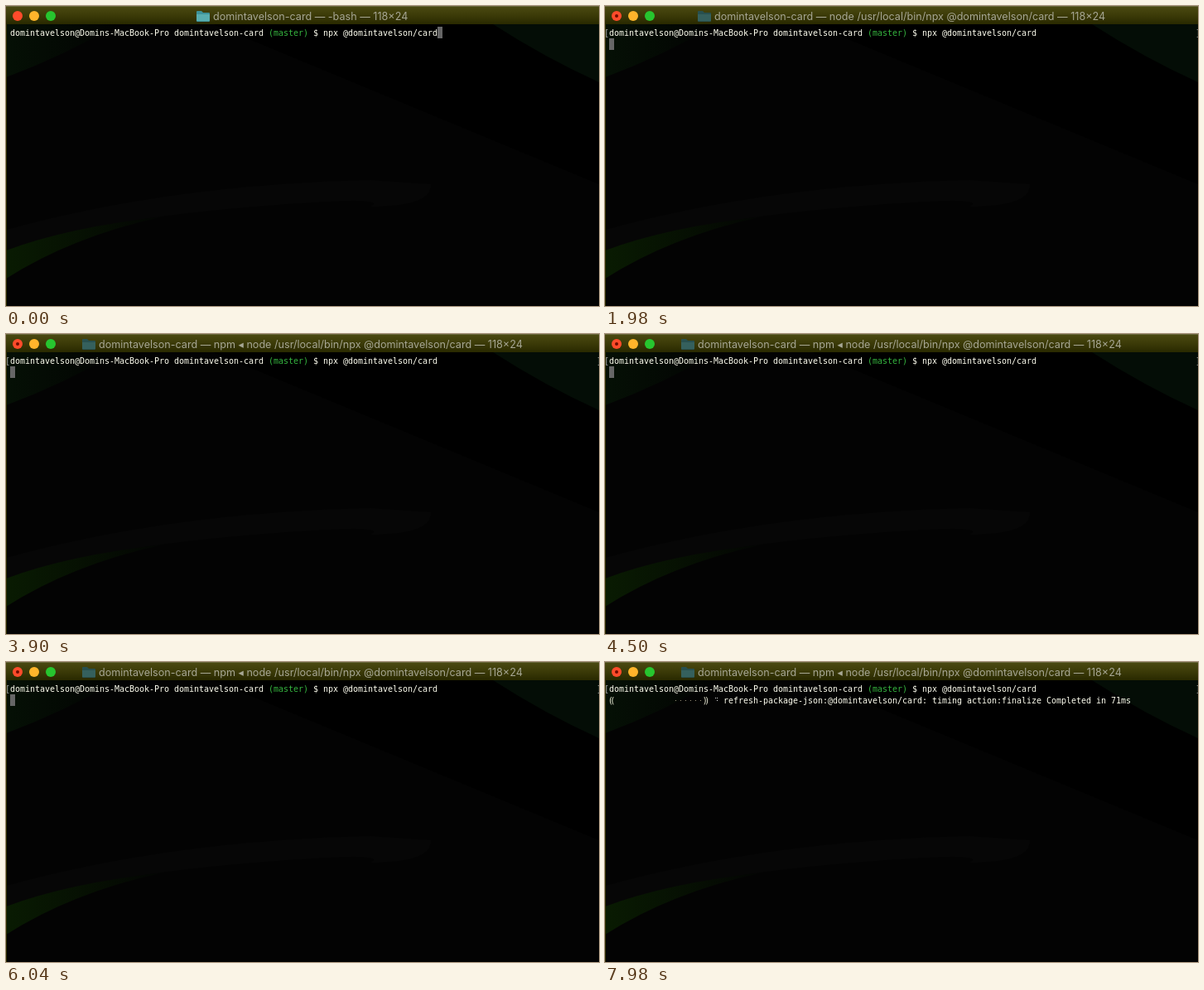
Recreate the animation shown at these times as an HTML page with a canvas. Size 716 by 362 pixels, loop 8000 ms.

```html
<!DOCTYPE html>
<html lang="en">
<head>
<meta charset="utf-8">
<title>Terminal</title>
<style>
  html, body { margin: 0; width: 100%; height: 100%; overflow: hidden; background: #000; }
  canvas { display: block; }
</style>
</head>
<body>
<canvas id="stage" width="716" height="362"></canvas>
<script>
const ctx = document.getElementById('stage').getContext('2d');
const WIDTH = 716, HEIGHT = 362, LOOP = 8000;
const CELL = 6, LINE = 14, LEFT = 5;
const MONO = '10px "DejaVu Sans Mono", monospace';
const SANS = '12.6px Inter, "DejaVu Sans", sans-serif';

const user = 'domintavelson';
const pkg = `@${user}/card`;
const prompt = [
  [`${user}@Domins-MacBook-Pro ${user}-card `, '#fffff0'],
  ['(master)', '#35b53f'],
  [` $ npx ${pkg}`, '#fffff0'],
];
const promptLength = prompt.reduce((sum, [text]) => sum + text.length, 0);

const ENTER = 1000, RUNNING = 1660, PROGRESS = 6400;
const npx = `node /usr/local/bin/npx ${pkg}`;
const titles = [
  [0, '-bash'],
  [RUNNING, npx],
  [2500, `npm ◂ ${npx}`],
  [PROGRESS, `node ◂ ${npx}`],
  [7540, `npm ◂ ${npx}`],
];
const messages = [
  [PROGRESS, `extract:${pkg}: verb lock using /Users/${user}/.npm/_locks/staging-9722b7db`],
  [7540, `refresh-package-json:${pkg}: timing action:finalize Completed in 71ms`],
];
const SPINNER = '⠋⠙⠹⠸⠼⠴⠦⠧⠇⠏';

const latest = (list, t) => list.filter(([start]) => start <= t).pop()[1];
const cellX = col => LEFT + col * CELL;

function rect(x, y, w, h, color) {
  ctx.fillStyle = color;
  ctx.fillRect(x, y, w, h);
}

function fillPath(path, color) {
  ctx.fillStyle = color;
  ctx.fill(new Path2D(path));
}

function disc(x, y, r, color) {
  ctx.fillStyle = color;
  ctx.beginPath();
  ctx.arc(x, y, r, 0, Math.PI * 2);
  ctx.fill();
}

function gradient(x0, y0, x1, y1, ...colors) {
  const g = ctx.createLinearGradient(x0, y0, x1, y1);
  colors.forEach((c, i) => g.addColorStop(i / (colors.length - 1), c));
  return g;
}

// Text on the terminal's character grid
function type(text, col, row, color) {
  ctx.font = MONO;
  ctx.fillStyle = color;
  [...text].forEach((ch, i) => ctx.fillText(ch, cellX(col + i), 36 + row * LINE));
}

function cursor(col, row) {
  rect(cellX(col), 25 + row * LINE, CELL, LINE, '#666');
}

function drawBackdrop() {
  rect(0, 0, WIDTH, HEIGHT, '#000');
  fillPath('M0 22H250L716 215V362H0Z', '#030303');
  fillPath('M0 22H135Q70 60 0 86Z', gradient(0, 0, 135, 0, '#051005', '#020302'));
  fillPath('M588 22H716V92Q650 62 588 22Z', '#040d06');
  fillPath('M0 295Q110 258 290 243T440 242Q515 242 513 215L440 210Q200 215 0 270Z', '#060606');
  fillPath('M0 295Q75 267 190 254Q80 278 0 329Z', gradient(0, 0, 190, 0, '#091b02', '#030503'));
  rect(0, 22, 1, HEIGHT - 22, '#303000');
}

function drawFolder(x, running) {
  const [back, front] = running ? ['#28504f', '#35605d'] : ['#3d9299', '#58adaf'];
  fillPath(`M${x} 7q0-1 1-1h5l2 2h7q1 0 1 1v9q0 1-1 1h-14q-1 0-1-1Z`, back);
  rect(x, 10, 16, 8, front);
}

function drawTitleBar(t) {
  const running = t >= RUNNING;
  rect(0, 0, WIDTH, 22, gradient(0, 0, 0, 22, '#4b4a12', '#3c3b08', '#292900'));
  rect(0, 0, WIDTH, 1, '#68673c');
  ['#ff4b2b', '#ffb52b', '#27c52f'].forEach((color, i) => disc(14 + 20 * i, 12, 6, color));
  if (running) disc(14, 12, 2, '#700c00');

  const text = `${user}-card — ${latest(titles, t)} — 118×24`;
  ctx.font = SANS;
  const x = Math.round((WIDTH - ctx.measureText(text).width - 20) / 2);
  drawFolder(x, running);
  ctx.fillStyle = '#a6a694';
  ctx.fillText(text, x + 20, 17);
}

function drawSpinner(t) {
  const glyph = SPINNER[(Math.floor(t / 77) + 8) % SPINNER.length];
  const bits = glyph.charCodeAt(0) - 0x2800;
  for (let i = 0; i < 6; i++) {
    if (bits >> i & 1) rect(cellX(21) + 2 + 2 * Math.floor(i / 3), 43 + 3 * (i % 3), 1, 1, '#ddd');
  }
}

function drawProgress(t) {
  const done = Math.floor(7 + (t - 6980) / 200);
  for (const shift of [0, 0.4]) {
    type('(', shift - 0.2, 1, '#eeeed8');
    type(')', 18.8 + shift, 1, '#eeeed8');
  }
  for (let col = done + 1; col <= 18; col++) rect(cellX(col) + 2, 46, 1, 1, '#99917a');
  drawSpinner(t);
  type(latest(messages, t), 23, 1, '#fffff0');
}

function draw(t) {
  drawBackdrop();
  drawTitleBar(t);
  let col = 0;
  for (const [text, color] of prompt) {
    type(text, col, 0, color);
    col += text.length;
  }
  if (t < ENTER) {
    cursor(promptLength, 0);
    return;
  }
  type('[', -1, 0, '#aaa');
  type(']', 118, 0, '#aaa');
  if (t < PROGRESS) cursor(0, 1);
  else drawProgress(t);
}

const start = performance.now();
function frame() {
  draw((performance.now() - start) % LOOP);
  requestAnimationFrame(frame);
}
frame();
</script>
</body>
</html>
```
